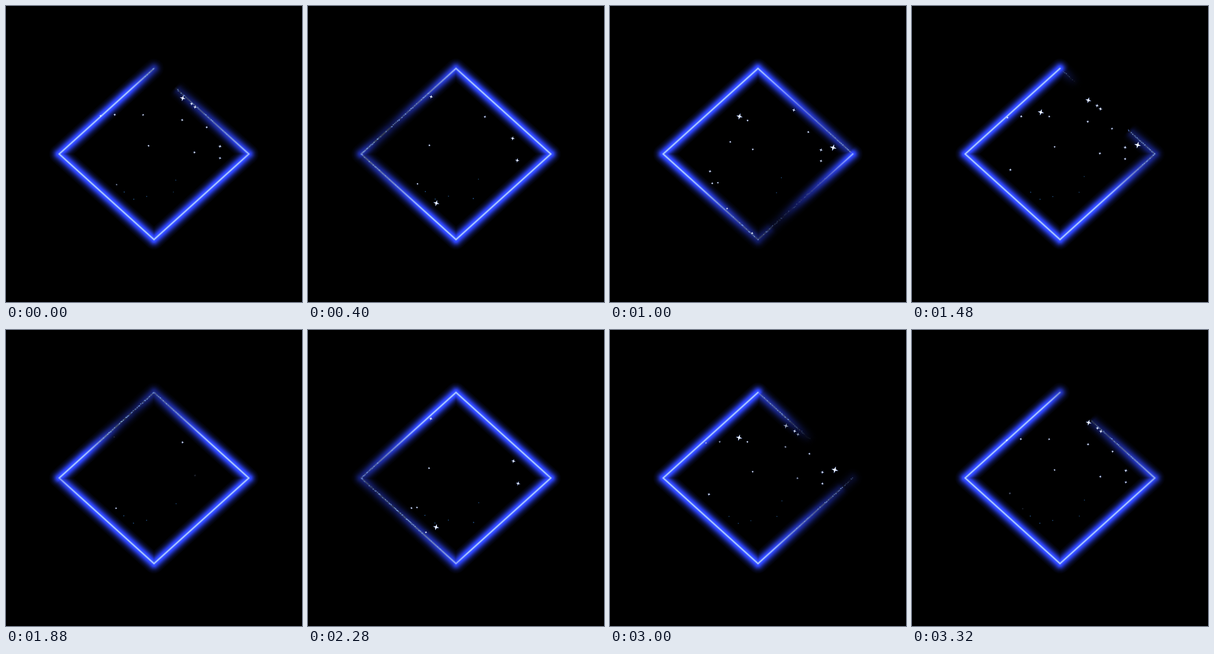
These frames come from a looping animation (512x512 px, 3.36 s). An HTML page with a canvas:

```html
<!DOCTYPE html>
<html>
<head>
<meta charset="utf-8">
<style>
html, body { margin: 0; width: 100%; height: 100%; overflow: hidden; background: #000; }
canvas { display: block; width: 512px; height: 512px; }
</style>
</head>
<body>
<canvas id="stage" width="512" height="512"></canvas>
<script>
const ctx = document.getElementById('stage').getContext('2d');
const LOOP = 1680, STEP = 40, SIDE_MS = 420, HEAD_START = 1362;
const RADIUS = 17, SOFTNESS = 9, STOPS = 32, GRAINS = 130;

// Right, top, left, bottom: the light runs anticlockwise.
const corners = [[420, 256], [256, 108], [92, 256], [256, 404]];

// Each fade is [start, end, lowest level], in ms since the head passed.
const sides = [
  { glow: [890, 1350, 0.42], core: [890, 1100, 0.7], gone: [1330, 1460] },
  { glow: [1460, 1630, 0.3], core: [1500, 1640, 0.65] },
  { glow: [1250, 1600, 0.32], core: [1300, 1620, 0.65] },
  { glow: [1290, 1640, 0.12], core: [1290, 1560, 0.25] }
];

// Stars sharing a life span: position at time "at", then size.
const starGroups = [
  { at: 1000, from: 800, to: 1860, stars: [[238, 198, 1.8], [318, 180, 3], [343, 218, 2], [365, 249, 2.8], [365, 268, 2.3], [247, 248, 1.7]] },
  { at: 1000, from: 800, to: 1600, stars: [[224, 191, 5.4], [386, 245, 5.8]] },
  { at: 1000, from: 820, to: 1680, stars: [[173, 286, 2.4]] },
  { at: 1480, from: 1250, to: 1900, stars: [[305, 163, 5], [326, 178, 3.2], [165, 193, 2.4], [189, 191, 2.2], [325, 255, 2.2]] },
  { at: 1480, from: 1250, to: 2180, stars: [[304, 200, 2.2]] },
  { at: 400, from: 240, to: 780, stars: [[354, 229, 3.5], [362, 267, 3.6], [213, 157, 3.2], [222, 341, 5.2]] },
  { at: 400, from: 240, to: 1180, stars: [[210, 241, 1.7]] },
  { at: 600, from: -60, to: 1180, stars: [[188.5, 307, 1.6]] },
  { at: 600, from: 460, to: 1180, stars: [[179, 308, 1.9], [204, 350, 1.9]] },
  { at: 1000, from: 900, to: 1140, stars: [[246, 393, 2.2]] }
];
const dimStars = [
  { at: 1000, from: 900, to: 1760, stars: [[288, 323, 0.8]] },
  { at: 1000, from: 0, to: 1680, stars: [[296.5, 297, 0.8]] },
  { at: 400, from: -440, to: 800, stars: [[203, 321, 1.1], [243, 329, 0.9], [220, 334, 1.1]] },
  { at: 400, from: 240, to: 800, stars: [[286, 333, 1.4]] }
];

const clamp = v => Math.max(0, Math.min(1, v));
const mix = (a, b, k) => a + (b - a) * k;
const mod = v => ((v % LOOP) + LOOP) % LOOP;
const fall = (q, [start, end, low]) => mix(1, low, clamp((q - start) / (end - start)));
const rgb = (r, g, b, k) =>
  `rgb(${[r, g, b].map(c => Math.round(Math.min(255, c * k))).join()})`;

function random(seed) {
  const v = Math.sin(seed * 127.1 + 31.7) * 43758.5453;
  return v - Math.floor(v);
}

function levels(index, along, time) {
  const side = sides[index];
  const q = mod(time - HEAD_START - SIDE_MS * (index + along));
  const alive = side.gone ? 1 - clamp((q - side.gone[0]) / (side.gone[1] - side.gone[0])) : 1;
  return {
    glow: Math.min(mix(0.25, 1, clamp(q / 380)), fall(q, side.glow)) * alive,
    core: Math.min(mix(0.5, 1, clamp(q / 300)), fall(q, side.core)) * alive
  };
}

function strokeSide(a, b, width, samples, colour) {
  const gradient = ctx.createLinearGradient(...a, ...b);
  samples.forEach((s, i) => gradient.addColorStop(i / STOPS, colour(s)));
  ctx.strokeStyle = gradient;
  ctx.lineWidth = width;
  ctx.beginPath();
  ctx.moveTo(...a);
  ctx.lineTo(...b);
  ctx.stroke();
}

function drawSide(index, time) {
  const a = corners[index], b = corners[(index + 1) % 4];
  const samples = Array.from({ length: STOPS + 1 }, (_, i) =>
    levels(index, Math.min(i / STOPS, 0.999), time));
  for (let r = RADIUS; r >= 1; r--) {
    const falloff = Math.exp(-(((r - 0.5) / SOFTNESS) ** 2));
    strokeSide(a, b, r * 2, samples, s => rgb(55, 82, 300, s.glow * falloff));
  }
  strokeSide(a, b, 4, samples, s => rgb(85, 118, 255, s.core * mix(0.3, 1, s.glow)));
  strokeSide(a, b, 1.8, samples, s => rgb(175, 202, 255, s.core * mix(0.3, 1, s.glow)));

  // Grains show where the light is thin.
  for (let i = 0; i < GRAINS; i++) {
    const seed = index * GRAINS + i, along = (i + random(seed)) / GRAINS;
    const s = levels(index, along, time);
    const power = s.core * clamp(1.25 - s.glow) * random(seed + 700) * 1.9;
    if (power < 0.06) continue;
    const spread = (random(seed + 1400) - 0.5) * mix(4, 1, s.core);
    const x = mix(a[0], b[0], along), y = mix(a[1], b[1], along) + spread;
    ctx.fillStyle = rgb(130, 175, 290, power);
    ctx.fillRect(x - 0.7, y - 0.7, 1.4, 1.4);
  }
}

function drawStar(x, y, size, colour) {
  ctx.save();
  ctx.translate(x, y);
  ctx.rotate(0.25);
  ctx.fillStyle = colour;
  ctx.beginPath();
  for (let i = 0; i < 8; i++) {
    const r = i % 2 ? Math.max(0.8, size * 0.32) : size;
    ctx.lineTo(r * Math.cos(i * Math.PI / 4), r * Math.sin(i * Math.PI / 4));
  }
  ctx.fill();
  ctx.restore();
}

function drawStars(groups, time, dim) {
  for (const { at, from, to, stars } of groups) {
    const age = mod(time - from), life = to - from;
    if (age > life) continue;
    const fade = life >= LOOP ? 1 : clamp(age / 100) * clamp((life - age) / 100);
    const seconds = (from + age - at) / 1000;
    for (const [x0, y0, size] of stars) {
      const x = x0 + (x0 - 256) * 0.07 * seconds;
      const y = y0 + (y0 - 340) * 0.1 * seconds;
      if (dim) {
        drawStar(x, y, size, rgb(35, 85, 140, fade));
      } else {
        drawStar(x, y, size + 0.7, rgb(30, 60, 150, fade));
        drawStar(x, y, size * mix(0.5, 1, fade), rgb(245, 250, 255, fade));
      }
    }
  }
}

function draw(now) {
  const time = Math.floor(now / STEP) * STEP % LOOP;
  ctx.globalCompositeOperation = 'source-over';
  ctx.fillStyle = '#000';
  ctx.fillRect(0, 0, 512, 512);
  ctx.globalCompositeOperation = 'lighten';
  ctx.lineCap = 'round';
  sides.forEach((_, i) => drawSide(i, time));
  drawStars(dimStars, time, true);
  drawStars(starGroups, time, false);
}

const start = performance.now();
function tick() {
  draw(performance.now() - start);
  requestAnimationFrame(tick);
}
tick();
</script>
</body>
</html>
```
